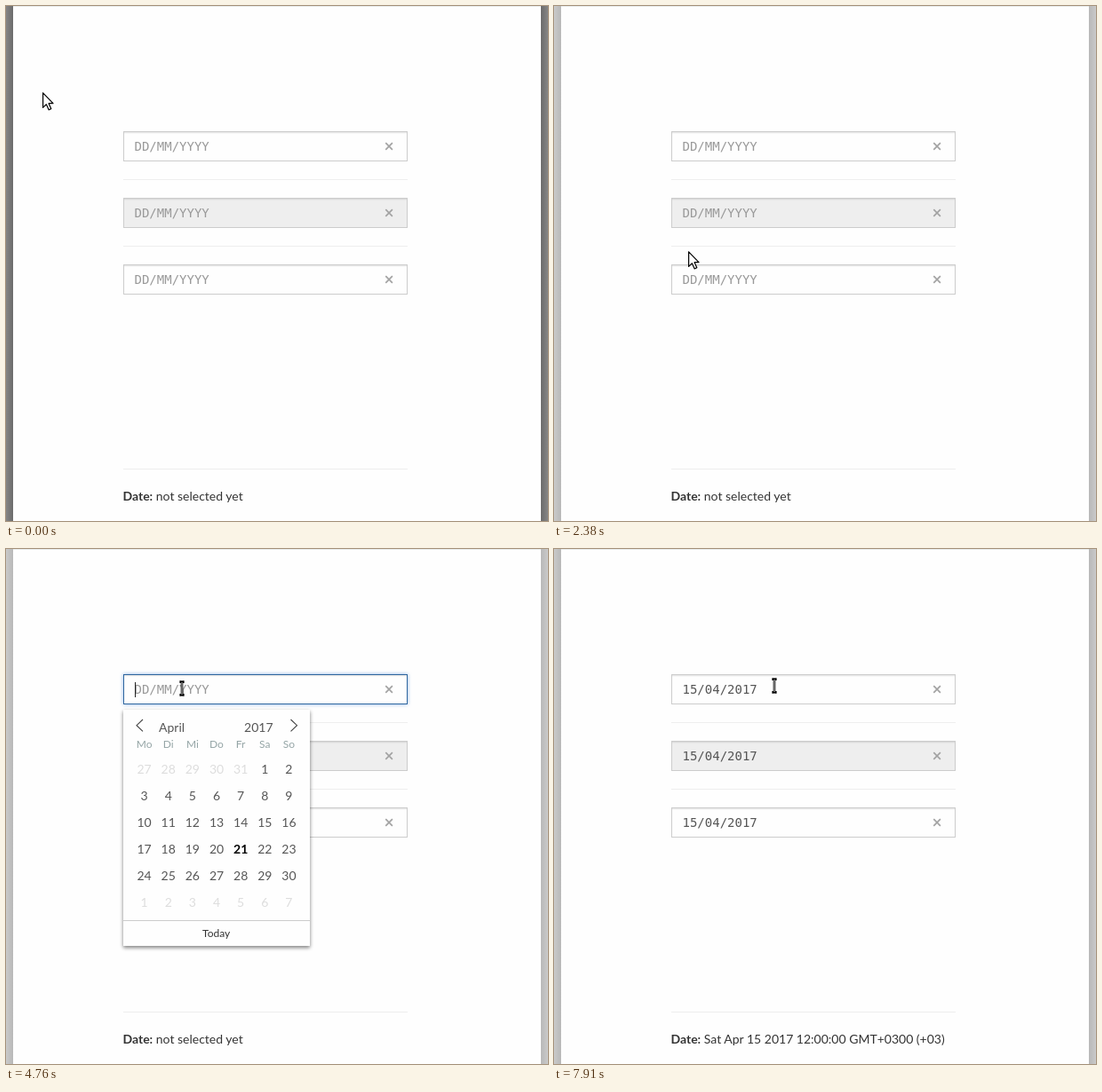
An HTML page for the animation above (8 s loop, 610 by 580 pixels).

```html
<!DOCTYPE html>
<html lang="en">
<head>
<meta charset="utf-8">
<title>Date picker</title>
<style>
html, body { margin: 0; width: 100%; height: 100%; overflow: hidden; background: #fefefe; }
svg { display: block; width: 610px; height: 580px; }
text { font: 14px Lato, sans-serif; fill: #555; white-space: pre; }
.mid { text-anchor: middle; }
.value { font-family: "DejaVu Sans Mono", monospace; }
.small { font-size: 12px; }
.week { fill: #95a5a6; }
.muted { fill: #ddd; }
.today { font-weight: 700; fill: #000; }
.dark { fill: #333; }
.thin { fill: none; stroke: #444; stroke-width: 1.1; }
.cross { fill: none; stroke: #a3a3a3; stroke-width: 1.7; }
.card { fill: #fefefe; filter: drop-shadow(0 2px 2px rgba(0,0,0,.42)) drop-shadow(0 0 .5px rgba(0,0,0,.3)); }
.ring { fill: #fefefe; stroke: #2f669f; filter: drop-shadow(0 0 2px rgba(80,140,215,.65)); }
.ink { fill: #fff; stroke: #000; stroke-width: 1.2; stroke-linejoin: round; }
</style>
</head>
<body>
<svg id="stage" viewBox="0 0 610 580">
  <defs>
    <linearGradient id="edge">
      <stop offset="0" stop-color="#cacaca"/>
      <stop offset="1" stop-color="#b8b8b8"/>
    </linearGradient>
    <linearGradient id="edgeDim">
      <stop offset="0" stop-color="#868686"/>
      <stop offset="1" stop-color="#6b6b6b"/>
    </linearGradient>
  </defs>
</svg>
<script>
const LOOP = 8000, STEP = 70;
const stage = document.getElementById('stage');

function add(parent, tag, attrs, text) {
  const el = document.createElementNS('http://www.w3.org/2000/svg', tag);
  for (const k in attrs) el.setAttribute(k, attrs[k]);
  if (text !== undefined) el.textContent = text;
  parent.appendChild(el);
  return el;
}
const rect = (p, x, y, width, height, more) => add(p, 'rect', { x, y, width, height, ...more });
const label = (p, x, y, cls, text) => add(p, 'text', { x, y, class: cls }, text);
const path = (p, d, cls) => add(p, 'path', { d, class: cls });
const show = (el, on) => el.setAttribute('opacity', +on);

// Page
rect(stage, 0, 0, 610, 580, { fill: '#fefefe' });
const sides = [
  rect(stage, 0, 0, 8, 580, {}),
  rect(stage, 0, 0, 8, 580, { transform: 'translate(610 0) scale(-1 1)' })
];
rect(stage, 8, 0, 594, 1, { fill: '#e9ecec' });
for (const y of [195, 270, 521]) rect(stage, 132, y, 320, 1, { fill: '#eee' });

function makeField(y, disabled) {
  const g = add(stage, 'g', {});
  rect(g, 132.5, y + .5, 319, 33, { fill: disabled ? '#eee' : '#fefefe', stroke: '#ccc' });
  const ring = rect(g, 132.5, y + .5, 319, 33, { class: 'ring' });
  rect(g, 133, y + 1, 318, 1, { fill: '#000', opacity: .085 });
  rect(g, 133, y + 2, 318, 1, { fill: '#000', opacity: .03 });
  const value = label(g, 144.5, y + 22, 'value', '');
  path(g, `M427.3 ${y + 13.2}l7.6 7.6m0 -7.6l-7.6 7.6`, 'cross');
  const caret = rect(g, 145, y + 9, 1, 17, { fill: '#222' });
  return { ring, value, caret };
}
const fields = [makeField(141), makeField(216, true), makeField(291)];

const dateLine = label(stage, 131.5, 557, 'dark', '');
add(dateLine, 'tspan', { 'font-weight': 700 }, 'Date:');
const dateText = add(dateLine, 'tspan', {}, '');

function makeCalendar(x, y, w, month, week) {
  const g = add(stage, 'g', {}), cell = (w - 20) / 7;
  const mid = c => x + 10 + cell * (c + .5);
  rect(g, x, y, w, 266, { class: 'card' });
  path(g, `M${x + 22} ${y + 11}l-7 6.7l7 6.7M${x + w - 21.5} ${y + 11}l7 6.7l-7 6.7`, 'thin');
  label(g, x + 40, y + 25, '', month);
  label(g, x + w - 41.5, y + 25, '', '2017').setAttribute('text-anchor', 'end');
  week.split(' ').forEach((d, c) => label(g, mid(c), y + 43, 'mid small week', d));
  const hover = rect(g, 0, 0, cell, 30, { fill: '#eee' });
  for (let i = 0; i < 42; i++) {
    const day = i < 5 ? 27 + i : i < 35 ? i - 4 : i - 34;
    const cls = i < 5 || i > 34 ? 'muted' : day === 21 ? 'today' : '';
    label(g, mid(i % 7), y + 72 + 30 * Math.floor(i / 7), 'mid ' + cls, day);
  }
  rect(g, x, y + 237, w, 1, { fill: '#ccc' });
  label(g, x + w / 2 - .3, y + 256, 'mid small dark', 'Today');
  return { g, x, y, cell, hover };
}
const lower = makeCalendar(132, 181, 210, 'April', 'Mo Di Mi Do Fr Sa So');
const upper = makeCalendar(241, 18, 211, 'április', 'h k sze cs p szo v');

// Pointers, each drawn around its hot spot
const pointer = add(stage, 'g', {});
const looks = { arrow: add(pointer, 'g', {}), beam: add(pointer, 'g', {}), hand: add(pointer, 'g', {}) };
path(looks.arrow, 'M.6 .8V17.4L4.4 13.8L7.2 19.9L9.8 18.7L7.1 12.7H12Z', 'ink');
const beam = 'M-2.6 -7.4H-1L0 -6.6L1 -7.4H2.6M0 -6.6V6.6M-2.6 7.4H-1L0 6.6L1 7.4H2.6';
add(looks.beam, 'path', { d: beam, fill: 'none', stroke: '#000', 'stroke-width': 2.6 });
add(looks.beam, 'path', { d: 'M0 -7V7', stroke: '#fff', 'stroke-width': .8 });
path(looks.hand, 'M-1.2 9.5V1.6Q-1.2 .5 .2 .5T1.6 1.6V6.2Q3 5.4 4.4 6.4Q6 5.7 7.2 6.9Q9.6 6.4 9.7 8.6V12.5L8.6 16.6H.6L-3.9 11.2Q-5 9.4 -3.6 8.8Q-2.6 8.4 -1.2 9.8', 'ink');
path(looks.hand, 'M2.2 10.2V13.6M4.6 10.2V13.6M7 10.2V13.6', 'thin');

// Pointer route: time, x, y
const route = [
  [70, 41, 97], [350, 95, 128], [560, 152, 160], [630, 160, 164],
  [1050, 160, 164], [1260, 124, 173], [1470, 83, 189], [1610, 76, 194],
  [1960, 76, 194], [2170, 104, 236], [2380, 151, 276], [2520, 184, 293.5], [2660, 207, 307],
  [2940, 207, 307], [3220, 135, 275], [3500, 79, 244],
  [3710, 79, 244], [3990, 140, 203], [4270, 198, 157],
  [5530, 198, 157], [5600, 190, 250], [5670, 268, 332], [5740, 347, 378],
  [5810, 347, 378], [5880, 300, 345], [5950, 258, 312], [6020, 237, 293.5],
  [6230, 238, 293.5], [6370, 263, 298], [6510, 288, 302],
  [7280, 288, 302], [7560, 268, 232], [7770, 252, 172], [7910, 248, 154]
];
function whereIs(t) {
  const i = route.findIndex(p => p[0] > t);
  if (i === 0) return route[0].slice(1);
  if (i < 0) return route[route.length - 1].slice(1);
  const [a, ax, ay] = route[i - 1], [b, bx, by] = route[i], k = (t - a) / (b - a);
  return [ax + (bx - ax) * k, ay + (by - ay) * k];
}

// Each visit: field, calendar, focus time, blur time
const visits = [
  [0, lower, 610, 1715],
  [2, upper, 2760, 3535],
  [0, lower, 4440, 6860]
];
const ease = (t, from, len) => {
  const k = Math.min(1, Math.max(0, (t - from) / len));
  return k * k * (3 - 2 * k);
};

function draw(now) {
  const t = Math.floor(now % LOOP / STEP) * STEP;
  const [x, y] = whereIs(t);
  const picked = t >= 7140;

  sides.forEach(s => s.setAttribute('fill', t < 140 ? 'url(#edgeDim)' : 'url(#edge)'));
  dateText.textContent = picked ? ' Sat Apr 15 2017 12:00:00 GMT+0300 (+03)' : ' not selected yet';
  for (const f of fields) {
    f.value.textContent = picked ? '15/04/2017' : 'DD/MM/YYYY';
    f.value.style.fill = picked ? '#555' : '#999';
    show(f.ring, 0);
    show(f.caret, 0);
  }
  for (const c of [lower, upper]) {
    show(c.g, 0);
    show(c.hover, 0);
  }

  let look = x > 132 && x < 452 && (Math.abs(y - 158) < 17 || Math.abs(y - 308) < 17) ? 'beam' : 'arrow';
  for (const [n, cal, focus, blur] of visits) {
    if (t < focus || t > blur + 600) continue;
    const open = ease(t, focus + 90, 210) - ease(t, blur + 240, 180);
    show(fields[n].ring, ease(t, focus, 150) - ease(t, blur, 130));
    show(fields[n].caret, t < blur);
    show(cal.g, open);
    if (open < .5) continue;
    const col = Math.floor((x - cal.x - 10) / cal.cell), row = Math.floor((y - cal.y - 52 - .0) / 30);
    if (col >= 0 && col < 7 && row >= 0 && row < 6) {
      look = 'hand';
      // The fingertip reaches slightly above the row it selects
      const r = Math.floor((y + 1 - cal.y - 52) / 30);
      cal.hover.setAttribute('x', cal.x + 10 + col * cal.cell);
      cal.hover.setAttribute('y', cal.y + 52 + r * 30);
      show(cal.hover, 1);
    }
  }

  for (const k in looks) show(looks[k], k === look);
  pointer.setAttribute('transform', `translate(${x} ${y})`);
}

const start = performance.now();
function tick() {
  draw(performance.now() - start);
  requestAnimationFrame(tick);
}
draw(0);
requestAnimationFrame(tick);
</script>
</body>
</html>
```
